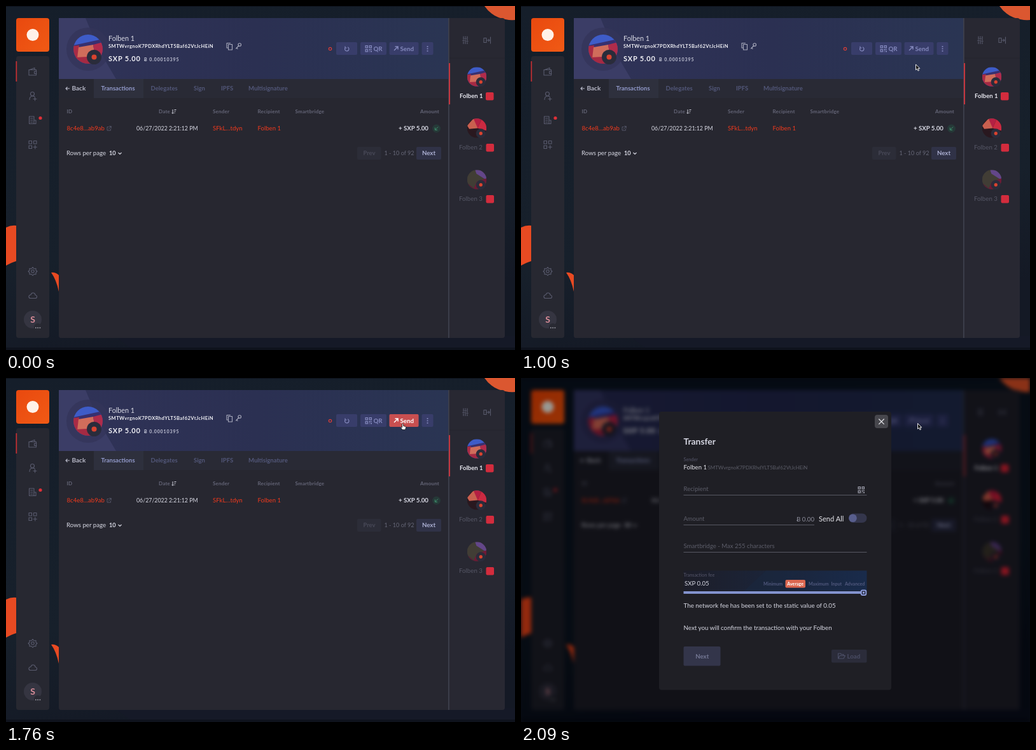
Recreate the animation shown at these times as an HTML page. Size 800x542 px, loop 3260 ms.

```html
<!DOCTYPE html>
<html lang="en">
<head>
<meta charset="utf-8">
<title>Wallet transfer</title>
<style>
html, body { margin: 0; width: 100%; height: 100%; overflow: hidden; background: #080b12; }
svg { display: block; width: 100%; height: 100%; }
text { font: 400 9.7px Lato, "Open Sans", sans-serif; fill: #d8d9e4; white-space: pre; }
.b { font-weight: 700; }
.head text { font-size: 8px; font-weight: 700; letter-spacing: .2px; fill: #656678; }
.tabs text { font-size: 9.5px; font-weight: 700; fill: #525779; }
.link text { fill: #f13a1d; font-size: 9.6px; }
.action { fill: #8489bd; }
.dim { fill: #565766; }
.hint text { fill: #5c5d69; font-size: 9.6px; }
.label text { fill: #55566a; font-size: 7.3px; }
.rates text { fill: #51597e; font-size: 7.1px; font-weight: 700; }
.icon { fill: none; stroke: #595b6e; stroke-width: 1.1; stroke-linecap: round; stroke-linejoin: round; }
.blurred { filter: blur(3px) contrast(1.12) brightness(.6); }
</style>
</head>
<body>
<svg viewBox="0 0 800 542" preserveAspectRatio="none">
<defs>
  <linearGradient id="page" x2=".3" y2="1">
    <stop stop-color="#151e2a"/><stop offset=".7" stop-color="#17202b"/><stop offset="1" stop-color="#141925"/>
  </linearGradient>
  <linearGradient id="banner"><stop stop-color="#303358"/><stop offset=".5" stop-color="#2b3052"/><stop offset="1" stop-color="#2a3553"/></linearGradient>
  <linearGradient id="orange" x2="1" y2="1"><stop stop-color="#e9490f"/><stop offset="1" stop-color="#f05a15"/></linearGradient>
  <linearGradient id="fee"><stop stop-color="#1d1e29"/><stop offset="1" stop-color="#192b4b"/></linearGradient>
  <clipPath id="disc"><circle r="23"/></clipPath>
  <clipPath id="bannerClip"><rect x="83" y="19" width="613" height="96"/></clipPath>
  <g id="coin"><circle cx="9.500" cy="12.500" r="11.500" fill="#2a2c3b"/><circle cx="9.500" cy="12.500" r="4" fill="#d9432f"/></g>
  <g id="grid"><path d="M.6.6h3.300v3.300H.6zM6.600.6h3.300v3.300H6.600zM.6 6.600h3.300v3.300H.6z" fill="none" stroke="currentColor" stroke-width="1.200"/><path d="M6 6h2v2H6zM8.500 8.500h2v2h-2zM8.500 6h2v1h-2zM6 9h1v1.500H6z" fill="currentColor"/></g>
  <path id="arrowUp" d="M0 7 6 1M1.500 1H6V5.500" fill="none" stroke="currentColor" stroke-width="1.500"/>
</defs>

<g id="app">
  <rect width="800" height="542" fill="url(#page)"/>
  <path d="M170 520 200 542H800V520Z" fill="#151927"/>
  <rect y="538" width="800" height="4" fill="#0f131d"/>
  <rect width="800" height="1" fill="#0d121b"/>
  <path d="M752 0H800V22Q787 23 774 18 760 12 752 0Z" fill="#db5730"/>
  <g fill="#e84a22">
    <path d="M0 349Q8 345 16 346V402Q9 404 0 409Z"/>
    <path d="M71 420Q77 419 83 424V450Q79 431 71 420Z"/>
  </g>

  <!-- Left navigation -->
  <rect x="16" y="19" width="52" height="53" rx="4" fill="url(#orange)"/>
  <circle cx="42" cy="45.500" r="9.500" fill="#fff1e8"/>
  <rect x="16" y="79" width="52" height="444" rx="4" fill="#272831"/>
  <rect x="15.500" y="87" width="1.700" height="32" fill="#c93033"/>
  <g class="icon">
    <path d="M36 101 45 97.500V100M36 100.500H47.500V109H36ZM48 103H44.500V106.500H48"/>
    <path d="M37 147.500Q37 142 42 142 44 142 45 143M45.500 144V149M43 146.500H48"/><circle cx="41.500" cy="138.500" r="3"/>
    <path d="M36.500 174H44V185.500H36.500ZM44 180H47V185.500H44M38.500 177H42M38.500 180H42M38.500 183H42"/>
    <path d="M36 212.500H40.500V217H36ZM43.500 212.500H48V217H43.500ZM36 220H40.500V224.500H36ZM45.800 219.500V225M43 222.200H48.500"/>
    <circle cx="42" cy="418" r="2.200"/><path d="M42 411.500 44 414 47 413.500 47 416.500 49 418 47 420 47 422.800 44 422.500 42 424.700 40 422.500 37 422.800 37 420 35 418 37 416.500 37 413.500 40 414Z"/>
    <path d="M38 460.500Q35.500 460 36 457 37 455 39 455 40 451.500 43 452 46 452.500 46 455.500 49 456 48.500 459 48 460.500 46 460.500Z"/>
  </g>
  <circle cx="54" cy="176.500" r="2.600" fill="#de3038"/>
  <circle cx="42" cy="494" r="14" fill="#353541"/>
  <text x="42" y="499" class="b" text-anchor="middle" style="font-size:14px;fill:#d98d99">S</text>
  <circle cx="50" cy="506" r="6" fill="#292a33"/>
  <path d="M46 507H54.500" stroke="#aaaab4" stroke-width="1.600" stroke-dasharray="1.600 1.700"/>

  <!-- Main panel -->
  <rect x="83" y="19" width="701" height="504" rx="4" fill="#282832"/>
  <rect x="83" y="19" width="613" height="504" rx="4" fill="#272730"/>
  <g clip-path="url(#bannerClip)">
    <rect x="83" y="19" width="613" height="96" fill="url(#banner)"/>
    <path d="M83 19H125Q145 70 173 115H83Z" fill="#3b3d66"/>
    <circle cx="129" cy="68" r="34" fill="#333559" opacity=".75"/>
  </g>
  <g id="avatarA" transform="translate(129 68)">
    <g clip-path="url(#disc)">
      <rect x="-23" y="-23" width="46" height="46" fill="#3e5cc8"/>
      <path d="M-23-6 23-16V23H-23Z" fill="#38306f"/>
      <path d="M-23-5-14-6-17 23H-23Z" fill="#a92b45"/>
      <path d="M-15-3 8-7 12 17-17 14Z" fill="#d06d5b"/>
      <path d="M8-7 23-11V14L11 12Z" fill="#b02c4b"/>
      <path d="M-20 13 17 11V23H-20Z" fill="#a52a43"/>
    </g>
    <use href="#coin"/>
  </g>
  <text x="161" y="55" style="font-size:10.800px">Folben 1</text>
  <text x="161" y="66" class="b" style="font-size:7.600px;letter-spacing:.4px;fill:#f0f0f5">SMTWvrgnoK7PDXRhdYLT5Baf62VtJcHEiN</text>
  <text x="161" y="87" class="b" style="font-size:11px;letter-spacing:.8px;fill:#f0f0f5">SXP 5.00</text>
  <text x="217" y="87" class="b" style="font-size:7px;letter-spacing:.9px;fill:#c3c5d6">Ƀ 0.00010395</text>
  <g class="icon" style="stroke:#a9abbd">
    <path d="M349.500 66H347V58.500H352.500M349.500 60.500H355.500V69H349.500Z"/>
    <path d="M361.500 67 366 62.500M362.500 66 364 67.500"/><circle cx="367.200" cy="61" r="2.300"/>
  </g>
  <circle cx="509.500" cy="67.500" r="2.200" fill="none" stroke="#d83e38" stroke-width="1.200"/>
  <g fill="#383d6a">
    <rect x="519" y="57" width="33" height="20" rx="2"/><rect x="557" y="57" width="41" height="20" rx="2"/>
    <rect x="602.500" y="57" width="46" height="20" rx="2"/><rect x="653.500" y="57" width="18" height="20" rx="2"/>
  </g>
  <g color="#8489bd">
    <path d="M533.500 65.500A3.200 3.200 0 1 0 537 64.800M533 63.500V66H535.500" fill="none" stroke="currentColor" stroke-width="1.200"/>
    <use href="#grid" x="564.500" y="62"/><use href="#arrowUp" x="610" y="63"/>
    <path d="M662.500 63V72" stroke="currentColor" stroke-width="1.800" stroke-dasharray="1.800 1.700"/>
  </g>
  <text x="577.500" y="70.500" class="b action">QR</text>
  <text x="619.500" y="70.500" class="b action">Send</text>
  <g id="hot" opacity="0" color="#fff">
    <rect x="602.500" y="57" width="46" height="20" rx="2" fill="#c84f50"/>
    <use href="#arrowUp" x="610" y="63"/><text x="619.500" y="70.500" class="b" style="fill:#fff">Send</text>
  </g>

  <rect x="83" y="115" width="613" height="30" fill="#292a35"/>
  <rect x="83" y="115" width="55" height="30" fill="#262731"/>
  <rect x="138" y="115" width="78" height="30" fill="#2e303d"/>
  <g class="tabs">
    <path d="M94 130H100M96.500 127.500 94 130 96.500 132.500" fill="none" stroke="#b8b9c8" stroke-width="1.100"/>
    <text x="103.500" y="133" style="fill:#b8b9c8;font-size:10px">Back</text>
    <text x="149.500" y="133" style="fill:#929acb">Transactions</text>
    <text x="227.500" y="133">Delegates</text><text x="295" y="133">Sign</text>
    <text x="338" y="133">IPFS</text><text x="381" y="133">Multisignature</text>
  </g>

  <g class="head">
    <text x="95.500" y="169">ID</text><text x="240" y="169">Date</text><text x="325" y="169">Sender</text>
    <text x="395.500" y="169">Recipient</text><text x="454.500" y="169">Smartbridge</text><text x="681" y="169" text-anchor="end">Amount</text>
  </g>
  <path d="M262 163V169.500M260.500 168 262 169.500 263.500 168M264.500 163.500H267.500M264.500 166H266.500M264.500 168.500H265.500" fill="none" stroke="#d0d1dc"/>
  <g class="link"><text x="95.500" y="196">8c4e8…ab9ab</text><text x="325" y="196">SFkL…tdyn</text><text x="395.500" y="196">Folben 1</text></g>
  <path class="icon" d="M161 190.500H159V196H164.500V194M161.500 193.500 165 190M162.500 189.500H165.200V192.500" style="stroke-width:.9"/>
  <text x="205" y="196" style="font-size:8.800px">06/27/2022 2:21:12 PM</text>
  <text x="664" y="196" class="b" text-anchor="end">+ SXP 5.00</text>
  <circle cx="676.500" cy="193" r="6.500" fill="#263938"/>
  <path d="M679 190.500 674.500 195M674.300 191.500V195.300H678" fill="none" stroke="#3f946f"/>
  <text x="95" y="235">Rows per page</text><text x="162" y="235" class="b" style="font-size:9.200px">10</text>
  <path d="M176.500 231 179 233.500 181.500 231" fill="none" stroke="#d8d9e4" stroke-width="1.200"/>
  <rect x="552" y="222" width="37.500" height="20" rx="2" fill="#2c2d38"/>
  <text x="571" y="235" class="b" text-anchor="middle" style="fill:#484958;font-size:9.400px">Prev</text>
  <text x="594.500" y="235" style="fill:#656676;font-size:9.100px">1 - 10 of 92</text>
  <rect x="645" y="222" width="39" height="20" rx="2" fill="#303247"/>
  <text x="664.500" y="235" class="b" text-anchor="middle" style="fill:#abafd2">Next</text>

  <!-- Wallet list -->
  <rect x="695" y="19" width="1.700" height="504" fill="#3e404d"/>
  <rect x="697" y="81.500" width="87" height="1" fill="#24242d"/>
  <rect x="696" y="90" width="2" height="65" fill="#c5363f"/>
  <g class="icon">
    <path d="M719 48V53M719 56V59.500M722 48V50M722 53V59.500M725 48V54M725 57V59.500M717.800 54.500H720.200M720.800 51.500H723.200M723.800 55.500H726.200"/>
    <path d="M751 50.500H755V57.500H751ZM761.500 49V59M755.500 54H760M758.500 52.300 760 54 758.500 55.700"/>
  </g>
  <use href="#avatarA" transform="translate(740 111.500) scale(.66) translate(-129 -68)"/>
  <g transform="translate(740 192.500) scale(.66)">
    <g clip-path="url(#disc)"><rect x="-23" y="-23" width="46" height="46" fill="#29181f"/><path d="M-23-6-8-23H6L2 0-18 2Z" fill="#c9604f"/><path d="M-8-23H12L2 0Z" fill="#b52043"/><path d="M2 0 12-23H23V6Z" fill="#cb2a41"/></g><use href="#coin"/>
  </g>
  <g transform="translate(740 273.500) scale(.66)">
    <g clip-path="url(#disc)"><rect x="-23" y="-23" width="46" height="46" fill="#413d35"/><path d="M-4-23H23V1L-1-14Z" fill="#634689"/><path d="M0 5 23-3V23H-8Z" fill="#6d1a35"/><path d="M-23 8-5 23H-23Z" fill="#5a1c35"/></g><use href="#coin"/>
  </g>
  <text x="713" y="145" class="b" style="font-size:9.500px;fill:#e5e5ed">Folben 1</text>
  <text x="712" y="226" class="dim">Folben 2</text><text x="712" y="307" class="dim">Folben 3</text>
  <g fill="#d32c3d"><rect x="754" y="136" width="12.500" height="12.500" rx="2"/><rect x="754.500" y="217" width="12.500" height="12.500" rx="2"/><rect x="754.500" y="298" width="12.500" height="12.500" rx="2"/></g>
</g>

<g id="modal" visibility="hidden">
  <rect x="217" y="53" width="365" height="438.500" rx="4" fill="#1f1f25"/>
  <rect x="556" y="58" width="21" height="21" rx="4" fill="#47474d"/>
  <path d="M562.300 64.500 570.700 72.900M570.700 64.500 562.300 72.900" stroke="#dedee3" stroke-width="1.300"/>
  <text x="255.500" y="104.500" class="b" style="font-size:13.900px;fill:#d5d6e2">Transfer</text>
  <g class="label"><text x="255.500" y="131">Sender</text></g>
  <text x="255.500" y="143.500" style="font-size:9.600px;fill:#e6e6ec">Folben 1</text>
  <text x="293.500" y="143.500" style="font-size:8px;fill:#5c5d68">SMTWvrgnoK7PDXRhdYLT5Baf62VtJcHEiN</text>
  <g class="hint"><text x="255.500" y="177.500">Recipient</text><text x="255.500" y="224.500" style="font-size:9.300px">Amount</text><text x="255.500" y="267.500">Smartbridge - Max 255 characters</text></g>
  <path d="M255.500 184.500H543.500M255.500 231.500H461M255.500 274.500H543.500" stroke="#575862"/>
  <use href="#grid" x="529.500" y="171" color="#9c9daa"/>
  <text x="461" y="225.500" text-anchor="end" style="fill:#8d8e9c">Ƀ 0.00</text>
  <text x="468" y="225.500" style="font-size:11.100px;fill:#e6e6ec">Send All</text>
  <rect x="515" y="213.500" width="28.500" height="14.500" rx="7.250" fill="#34364c"/><circle cx="521.500" cy="220.700" r="6.300" fill="#585e8d"/>

  <rect x="255.500" y="303.500" width="288" height="32" fill="url(#fee)"/>
  <path d="M350 336 385 303.500H440L405 336Z" fill="#1a2940" opacity=".45"/>
  <g class="label"><text x="255.500" y="313">Transaction fee</text></g>
  <text x="257" y="327">SXP 0.05</text>
  <rect x="415.500" y="318" width="31.500" height="12.500" rx="2" fill="#dc6750"/>
  <g class="rates">
    <text x="381" y="326.500">Minimum</text><text x="431.200" y="326.500" text-anchor="middle" style="fill:#fff">Average</text>
    <text x="452" y="326.500">Maximum</text><text x="487.500" y="326.500">Input</text><text x="509" y="326.500">Advanced</text>
  </g>
  <rect x="255.500" y="336" width="284" height="4" fill="#8393ce"/>
  <rect x="534.700" y="334.500" width="7.600" height="7.600" rx="2" fill="#1c2030" stroke="#8d9cdb" stroke-width="2"/>
  <rect x="537" y="336.800" width="3" height="3" fill="#8d9cdb"/>
  <text x="255.500" y="362" style="font-size:9.800px">The network fee has been set to the static value of 0.05</text>
  <text x="255.500" y="397" style="font-size:9.800px">Next you will confirm the transaction with your Folben</text>
  <rect x="255.500" y="423" width="58" height="30.500" rx="2" fill="#33354a"/>
  <text x="284.700" y="441.500" class="b" text-anchor="middle" style="fill:#747894">Next</text>
  <rect x="488" y="428" width="55.500" height="20.500" rx="2" fill="#2b2c3a"/>
  <path class="icon" d="M498.500 442V434H502L503.500 435.500H507V437.500M498.500 442 501 437.500H509.500L507 442Z" style="stroke:#4d5068"/>
  <text x="512.500" y="441.500" class="b" style="fill:#4a4d64">Load</text>
</g>

<g id="cursor" visibility="hidden" stroke-linejoin="round">
  <path id="arrow" d="M0 0V8.800L2 7 3.500 10.200 5 9.500 3.600 6.400H6.300Z" fill="#111" stroke="#fff" stroke-width=".9"/>
  <path id="hand" d="M-1 1Q0-.5 1 1V4L4.500 4.700Q5.300 5 5 6.500L4 9.800H-.5L-3 6.500Q-3 5-1 6.300Z" fill="#fff" stroke="#151515" stroke-width=".8"/>
</g>
</svg>
<script>
const LOOP = 3260, HOVER = 1240, OPEN = 1790;
const path = [[380, 545, 150], [640, 590, 107.5], [1000, 620.5, 92], [HOVER, 623.5, 78], [1480, 624, 73], [OPEN, 623.5, 71.5]];
const el = id => document.getElementById(id);
const [app, modal, hot, cursor, arrow, hand] = ["app", "modal", "hot", "cursor", "arrow", "hand"].map(el);
const ramp = (t, from, span) => Math.min(1, Math.max(0, (t - from) / span));
const show = (node, on) => node.setAttribute("visibility", on ? "visible" : "hidden");

function cursorAt(t) {
  const next = path.findIndex(p => p[0] > t);
  if (next < 0) return path.at(-1).slice(1);
  if (next === 0) return path[0].slice(1);
  const a = path[next - 1], b = path[next];
  const k = ramp(t, a[0], b[0] - a[0]);
  return [1, 2].map(i => a[i] + (b[i] - a[i]) * k);
}

function draw() {
  const t = performance.now() % LOOP;
  const open = t >= OPEN, moving = t >= path[0][0];
  const hovering = t >= HOVER && !open;
  app.classList.toggle("blurred", open);
  show(modal, open);
  hot.setAttribute("opacity", open ? 1 - ramp(t, OPEN, 210) : ramp(t, HOVER, 160));
  cursor.setAttribute("transform", `translate(${cursorAt(t)})`);
  show(arrow, moving && !hovering);
  show(hand, hovering);
  requestAnimationFrame(draw);
}
draw();
</script>
</body>
</html>
```
